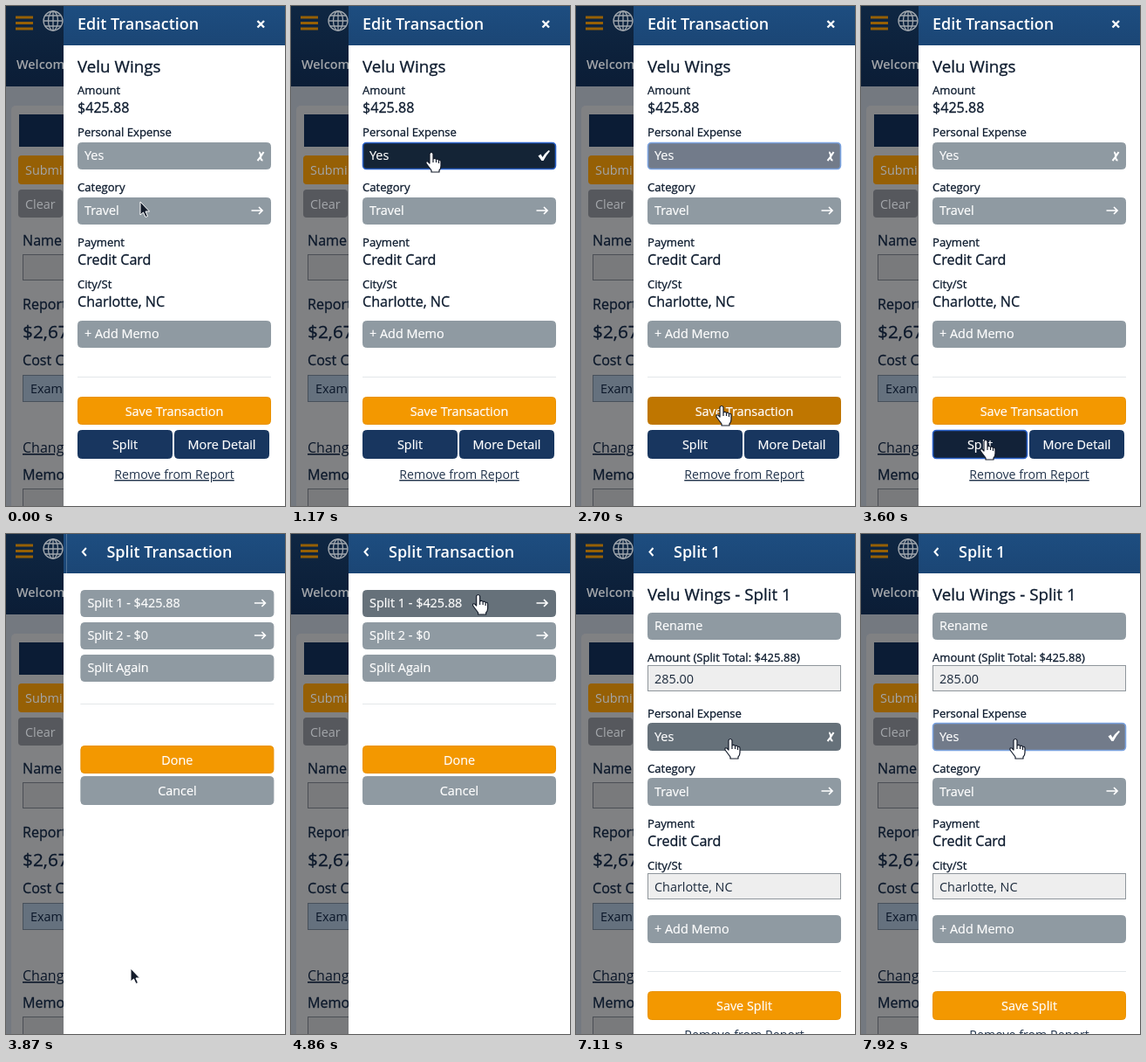
Write an HTML page that moves like this. It is 320 px wide and 572 px high and loops after 8 s.

```html
<!DOCTYPE html>
<html lang="en">
<head>
<meta charset="utf-8">
<title>Edit Transaction</title>
<style>
  html, body { margin: 0; width: 100%; height: 100%; overflow: hidden; background: #fff; }
  svg { display: block; width: 100%; height: 100%; }
  text { font: 14.4px "Open Sans", sans-serif; fill: #1c2a3c; white-space: pre; }
  .title { font-size: 18px; font-weight: 600; fill: #fff; }
  .heading, .label, .value, .total { fill: #0d1b2e; stroke: #0d1b2e; stroke-width: .3px; }
  .heading { font-size: 18.8px; }
  .label { font-size: 13.1px; }
  .value { font-size: 16.1px; }
  .total { font-size: 20.8px; }
  .white { fill: #fff; stroke: #fff; stroke-width: .2px; }
  .link { font-size: 14.2px; fill: #22344c; text-decoration: underline; }
  .icon { fill: none; stroke: #fff; stroke-width: 2; }
  .dim text { fill: #0b1729; }
  .dim .pale { fill: #a3a6aa; }
  .dim .greeting { font-weight: 600; }
  .dim .link { font-size: 16px; }
</style>
</head>
<body>
<svg id="stage" viewBox="0 0 320 572"></svg>
<script>
const LOOP = 8000, PANEL_X = 66;
const GREY = { base: '#8f9aa2', hover: '#66717a', focus: '#727b8a', press: '#142436' };
const ORANGE = { base: '#f39800', hover: '#bf7600', focus: '#bf7600', press: '#a86800', border: '#e99100' };
const NAVY = { base: '#18365f', hover: '#122540', focus: '#122540', press: '#122238' };
const ICONS = {
  cross: '<path class="icon" d="M288.500 177Q292 173 295.500 167M290 167.500Q292 167.500 292 172T294.500 176.500"/>',
  check: '<path fill="#fff" d="M283.500 171.500L286.500 169.500L288.500 173Q291.500 168 295.500 165L297 166Q292.500 171 289.500 177H287.500Z"/>',
  arrow: '<path class="icon" style="stroke-width:1.700" d="M281.500 171H294M290 167L294 171L290 175"/>'
};

const text = (x, y, str, cls = '', anchor = 'start') =>
  `<text x="${x}" y="${y}" class="${cls}" text-anchor="${anchor}">${str}</text>`;
const rect = (x, y, w, h, fill, extra = '') =>
  `<rect x="${x}" y="${y}" width="${w}" height="${h}" fill="${fill}" ${extra}/>`;
const rule = y => rect(82, y, 222, 1, '#e3e7ea');
const field = (y, str) =>
  rect(82.5, y + .5, 221, 29, '#eee', 'stroke="#8f969c"') + text(90, y + 21, str);
const icon = (name, y) => `<g data-icon="${name}" transform="translate(0 ${y - 156})">${ICONS[name]}</g>`;

function button(id, y, h, label, { colors = GREY, x = 82, w = 222, center = false, icons = [] } = {}) {
  buttons.push({ id, x, y, w, h, colors });
  const baseline = Math.round(y + h / 2 + (center ? 5.5 : 4.8));
  return `<g id="${id}">${rect(x + .5, y + .5, w - 1, h - 1, colors.base, 'rx="4"')}`
    + text(center ? x + w / 2 : 90, baseline, label, 'white', center ? 'middle' : 'start')
    + icons.map(name => icon(name, y)).join('') + '</g>';
}

function screen(index, title, body) {
  const back = '<path class="icon" d="M88.500 16L84.500 20.500L88.500 25"/>';
  const close = '<path class="icon" style="stroke-width:2.400" d="M288.500 17L296 24.500M296 17L288.500 24.500"/>';
  return `<g id="screen${index}">${rect(PANEL_X, 0, 254, 572, '#fff')}${rect(PANEL_X, 0, 254, 45, 'url(#bar)')}`
    + text(index ? 112 : 82, 27, title, 'title') + (index ? back : close) + body + '</g>';
}

const toggles = { icons: ['cross', 'check'] }, next = { icons: ['arrow'] };
const primary = { colors: ORANGE, center: true };
let buttons = [];
const groups = [];
const build = (index, title, body) => {
  const markup = screen(index, title, body());
  groups.push(buttons);
  buttons = [];
  return markup;
};

const page = `<g class="dim">
  ${rect(0, 0, 70, 572, '#747980')}${rect(0, 0, 70, 92, 'url(#dimBar)')}
  ${rect(6, 114, 80, 480, '#808183', 'rx="5"')}
  ${[11.5, 18, 24.5].map(y => rect(11, y, 20, 3, '#966005')).join('')}
  <g fill="none" stroke="#a0a6ad" stroke-width="1.300">
    <circle cx="54" cy="17" r="11"/><ellipse cx="54" cy="17" rx="5.500" ry="11"/>
    <path d="M54 6V28M43 17H65M45 11H63M45 23H63"/>
  </g>
  ${text(12, 72, 'Welcom', 'pale greeting')}
  ${rect(15, 124, 60, 37, '#0b1c35')}
  ${rect(14, 171, 60, 33, '#966005', 'rx="4"')}${text(22, 193, 'Submi', 'pale')}
  ${rect(14, 210, 51, 32, '#56585d', 'rx="4"')}${text(22, 232, 'Clear', 'pale')}
  ${text(19, 274, 'Name', 'value')}${rect(19.5, 284.5, 60, 29, '#797a7c', 'stroke="#4b4f55"')}
  ${text(19, 347, 'Report', 'value')}
  ${text(19, 380, '$2,67', 'total')}
  ${text(19, 411, 'Cost C', 'value')}${rect(19.5, 422.5, 60, 30, '#65717e', 'stroke="#47505b"')}
  ${text(28, 443, 'Examp')}
  ${text(19, 511, 'Chang', 'link')}
  ${text(19, 542, 'Memo', 'value')}${rect(19.5, 552.5, 60, 30, '#797a7c', 'stroke="#4b4f55"')}
</g>`;

const edit = build(0, 'Edit Transaction', () =>
  text(82, 76, 'Velu Wings', 'heading')
  + text(82, 101, 'Amount', 'label') + text(82, 122, '$425.88', 'value')
  + text(82, 149, 'Personal Expense', 'label') + button('personal', 156, 31, 'Yes', toggles)
  + text(82, 212, 'Category', 'label') + button('category', 219, 31, 'Travel', next)
  + text(82, 275, 'Payment', 'label') + text(82, 296, 'Credit Card', 'value')
  + text(82, 323, 'City/St', 'label') + text(82, 344, 'Charlotte, NC', 'value')
  + button('memo', 360, 31, '+ Add Memo') + rule(424)
  + button('save', 447, 32, 'Save Transaction', primary)
  + button('split', 485, 33, 'Split', { colors: NAVY, w: 109, center: true })
  + button('detail', 485, 33, 'More Detail', { colors: NAVY, x: 193, w: 109, center: true })
  + text(193, 541, 'Remove from Report', 'link', 'middle'));

const list = build(1, 'Split Transaction', () =>
  button('first', 64, 31, 'Split 1 - $425.88', next)
  + button('second', 101, 31, 'Split 2 - $0', next)
  + button('again', 138, 31, 'Split Again') + rule(194)
  + button('done', 242, 32, 'Done', primary)
  + button('cancel', 277, 33, 'Cancel', { center: true }));

const part = build(2, 'Split 1', () =>
  text(82, 76, 'Velu Wings - Split 1', 'heading') + button('rename', 90, 31, 'Rename')
  + text(82, 146, 'Amount (Split Total: $425.88)', 'label') + field(150, '285.00')
  + text(82, 210, 'Personal Expense', 'label') + button('partPersonal', 216, 32, 'Yes', toggles)
  + text(82, 273, 'Category', 'label') + button('partCategory', 279, 32, 'Travel', next)
  + text(82, 336, 'Payment', 'label') + text(82, 357, 'Credit Card', 'value')
  + text(82, 384, 'City/St', 'label') + field(388, 'Charlotte, NC')
  + button('partMemo', 436, 32, '+ Add Memo') + rule(500)
  + button('saveSplit', 523, 33, 'Save Split', primary)
  + text(193, 578, 'Remove from Report', 'link', 'middle'));

const gradient = (id, top, bottom) =>
  `<linearGradient id="${id}" x2="0" y2="1"><stop stop-color="${top}"/><stop offset="1" stop-color="${bottom}"/></linearGradient>`;
const $ = id => document.getElementById(id);

$('stage').innerHTML = `<defs>${gradient('bar', '#1d4d80', '#1b4675')}${gradient('dimBar', '#0f2743', '#0b1d36')}
  <clipPath id="panel">${rect(PANEL_X, 0, 254, 572, '#fff')}</clipPath></defs>
  ${page}<g clip-path="url(#panel)">${edit}${list}${part}</g>
  <g id="cursor" stroke-linejoin="round">
    <path id="pointer" fill="#141c2b" stroke="#fff" d="M0 0V15L3.500 12L6 17.500L8.500 16.500L6 11H10.500Z"/>
    <path id="hand" fill="#fff" stroke="#141c2b" stroke-width="1.200" d="M-2 1Q0-2 2 1V7Q4 5.500 5.500 7.500Q7.500 6.500 8.500 8.500Q11 7.500 11 10.500V15Q11 18 9 20V22H0V20L-6 12Q-6.500 9 -4 10L-2 12ZM2 7V11M5.500 8V11M8.500 9V12"/>
  </g>`;

// Cursor tip: time, x, y
const path = [[0, 154, 224], [450, 161, 168], [1900, 161, 168], [2450, 167, 458], [2800, 167, 458],
  [3250, 143, 497], [3900, 143, 497], [4650, 214, 70], [5000, 215, 70], [5500, 216, 70], [6200, 216, 70],
  [7000, 177, 235], [8000, 177, 235]];
const presses = [['personal', 1000, 1260], ['personal', 1700, 1880], ['split', 3430, 3640],
  ['first', 5540, 5680], ['partPersonal', 7290, 7450]];
const slides = [0, 3640, 5700], SLIDE_TIME = 260;

function cursorAt(t) {
  const i = path.findIndex(point => point[0] > t);
  const [t0, x0, y0] = path[i - 1], [t1, x1, y1] = path[i];
  const p = (t - t0) / (t1 - t0), e = p * p * (3 - 2 * p);
  return [x0 + (x1 - x0) * e, y0 + (y1 - y0) * e];
}

function draw(t) {
  const [cx, cy] = cursorAt(t);
  const current = slides.filter(start => start <= t).length - 1;
  const pressed = presses.find(([, from, to]) => t >= from && t < to)?.[0];
  const focused = presses.filter(([, from]) => from <= t).pop()?.[0];
  let overButton = false;

  groups.forEach((group, index) => {
    const start = slides[index], p = Math.min(1, Math.max(0, (t - start) / SLIDE_TIME));
    const shift = index ? 254 * (1 - p) ** 2 : 0;
    const node = $('screen' + index);
    node.setAttribute('visibility', index <= current ? 'visible' : 'hidden');
    node.setAttribute('transform', `translate(${shift} 0)`);

    for (const { id, x, y, w, h, colors } of group) {
      const over = index === current && t >= 90 && cx >= x && cx <= x + w && cy >= y && cy <= y + h;
      overButton ||= over;
      const state = id === pressed ? 'press' : id === focused ? 'focus' : over ? 'hover' : 'base';
      const ring = { press: '#2b62c9', focus: '#7ba3e0' }[state];
      const box = $(id).firstChild;
      box.setAttribute('fill', colors[state]);
      box.setAttribute('stroke', ring || (state === 'base' && colors.border) || colors[state]);
      box.setAttribute('stroke-width', ring ? 1.6 : 1);
      const check = $(id).querySelector('[data-icon=check]');
      if (check) {
        const on = presses.filter(([name, from]) => name === id && from <= t).length % 2;
        check.style.display = on ? '' : 'none';
        check.previousSibling.style.display = on ? 'none' : '';
      }
    }
  });

  const hand = overButton || (t >= slides[2] && t < 6250);
  $('hand').style.display = hand ? '' : 'none';
  $('pointer').style.display = hand ? 'none' : '';
  $('cursor').setAttribute('transform', `translate(${cx} ${cy})`);
}

let origin;
function tick(now) {
  origin ??= now;
  draw((now - origin) % LOOP);
  requestAnimationFrame(tick);
}
draw(0);
requestAnimationFrame(tick);
</script>
</body>
</html>
```
